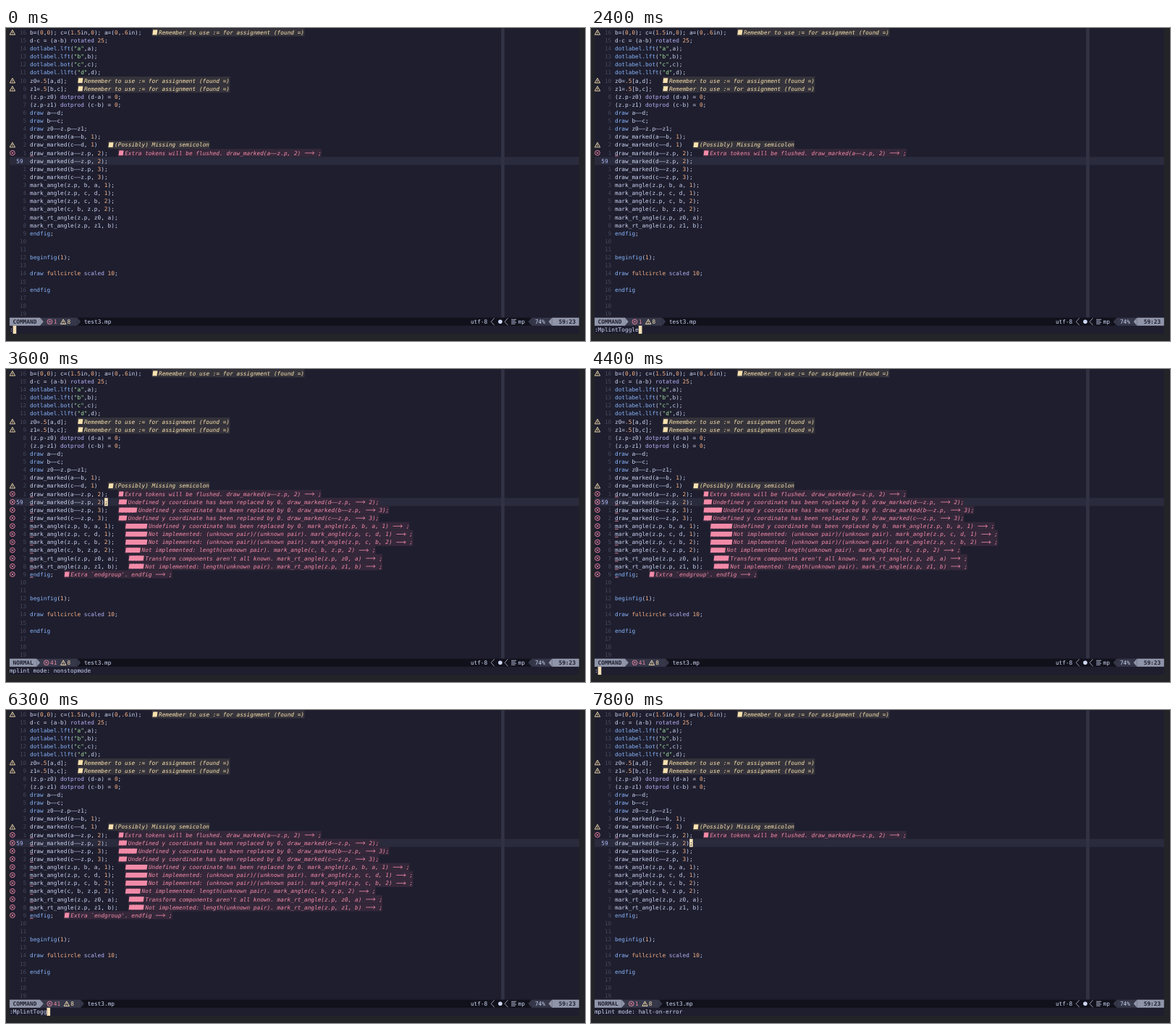
These frames come from a looping animation (800 by 433 pixels, 8 s). An HTML page:

```html
<!DOCTYPE html>
<html lang="en">
<head>
<meta charset="utf-8">
<title>Linting in the editor</title>
<style>
  html, body { margin: 0; width: 100%; height: 100%; overflow: hidden; background: #232427; }
  svg { display: block; width: 100vw; height: 100vh; }
  text {
    font: 7.78px "DejaVu Sans Mono", monospace;
    font-variant-ligatures: none;
    text-rendering: geometricPrecision;
    white-space: pre;
  }
  .it { font-style: italic; }
  .b { font-weight: bold; }
</style>
</head>
<body>
<svg id="stage" viewBox="0 0 800 433">
  <g id="page"></g>
  <g id="lint"></g>
  <g id="live"></g>
</svg>
<script>
const CELL = 4.684, ROW = 11.12, LEFT = 4.9, TOP = 0.4, COLS = 168;
const CURRENT = 16, STATUS = 36, PROMPT = 37, CODE = 6;
const C = {
  base: '#1e1e2e', text: '#cdd6f4', dim: '#45475a', line: '#2a2b3c', rule: '#313244',
  black: '#11111b', chip: '#9095a9', panel: '#36384a', cursor: '#f5e0b8',
  warn: '#f9e2af', warnBg: '#35333b', error: '#f38ba8', errorBg: '#34283a',
  key: '#89b4fa', op: '#b4b0f5', num: '#fab387', str: '#a6e3a1', number: '#b4befe'
};

const code = [
  'b=(0,0); c=(1.5in,0); a=(0,.6in);', 'd-c = (a-b) rotated 25;',
  'dotlabel.lft("a",a);', 'dotlabel.lft("b",b);', 'dotlabel.bot("c",c);', 'dotlabel.llft("d",d);',
  'z0=.5[a,d];', 'z1=.5[b,c];', '(z.p-z0) dotprod (d-a) = 0;', '(z.p-z1) dotprod (c-b) = 0;',
  'draw a--d;', 'draw b--c;', 'draw z0--z.p--z1;', 'draw_marked(a--b, 1);', 'draw_marked(c--d, 1)',
  'draw_marked(a--z.p, 2);', 'draw_marked(d--z.p, 2);', 'draw_marked(b--z.p, 3);', 'draw_marked(c--z.p, 3);',
  'mark_angle(z.p, b, a, 1);', 'mark_angle(z.p, c, d, 1);', 'mark_angle(z.p, c, b, 2);',
  'mark_angle(c, b, z.p, 2);', 'mark_rt_angle(z.p, z0, a);', 'mark_rt_angle(z.p, z1, b);',
  'endfig;', '', '', 'beginfig(1);', '', 'draw fullcircle scaled 10;', '', 'endfig', '', '', ''
];

const ASSIGN = 'Remember to use := for assignment (found =)';
const COORD = 'Undefined y coordinate has been replaced by 0. ';
const MISSING = 'Not implemented: ';
const PAIRS = MISSING + '(unknown pair)/(unknown pair). ';
const LENGTH = MISSING + 'length(unknown pair). ';
const warnings = [[0, ASSIGN], [6, ASSIGN], [7, ASSIGN], [14, '(Possibly) Missing semicolon']];
const firstError = [15, 1, 'Extra tokens will be flushed. draw_marked(a--z.p, 2) --> ;'];
const moreErrors = [
  [16, 2, COORD + 'draw_marked(d--z.p, --> 2);'],
  [17, 5, COORD + 'draw_marked(b--z.p, --> 3);'],
  [18, 2, COORD + 'draw_marked(c--z.p, --> 3);'],
  [19, 6, COORD + 'mark_angle(z.p, b, a, 1) --> ;'],
  [20, 6, PAIRS + 'mark_angle(z.p, c, d, 1) --> ;'],
  [21, 6, PAIRS + 'mark_angle(z.p, c, b, 2) --> ;'],
  [22, 4, LENGTH + 'mark_angle(c, b, z.p, 2) --> ;'],
  [23, 4, "Transform components aren't all known. mark_rt_angle(z.p, z0, a) --> ;"],
  [24, 4, LENGTH + 'mark_rt_angle(z.p, z1, b) --> ;'],
  [25, 1, "Extra `endgroup'. endfig --> ;"]
];

const x = col => LEFT + col * CELL;
const y = row => TOP + row * ROW;
const escape = s => s.replace(/&/g, '&amp;').replace(/</g, '&lt;').replace(/>/g, '&gt;');
const joinDashes = s => s.replace(/--/g, '––');

const box = (col, row, cols, fill, rows = 1) =>
  `<rect x="${x(col)}" y="${y(row)}" width="${cols * CELL}" height="${rows * ROW}" fill="${fill}"/>`;
const stroke = (d, color, width = 0.8) =>
  `<path d="${d}" fill="none" stroke="${color}" stroke-width="${width}" stroke-linejoin="round"/>`;
const markup = (col, row, content, fill, cls = '') =>
  `<text x="${x(col)}" y="${y(row) + 8.4}" fill="${fill}" class="${cls}">${content}</text>`;
const write = (col, row, s, fill, cls) => markup(col, row, escape(s), fill, cls);

// Powerline wedge, one cell wide; dir 1 points right, -1 left
function wedge(col, row, dir, fill) {
  const flat = x(dir > 0 ? col : col + 1), tip = x(dir > 0 ? col + 1 : col);
  return `<path d="M${flat} ${y(row)}L${tip} ${y(row) + ROW / 2}L${flat} ${y(row + 1)}z" fill="${fill}"/>`;
}

function warnIcon(col, row) {
  const cx = x(col) + 4, cy = y(row) + 5.6;
  return stroke(`M${cx} ${cy - 3.4}l3.7 6.6h-7.4zM${cx} ${cy - 1}v2.2M${cx} ${cy + 1.7}v.8`, C.warn, 0.9);
}

function errorIcon(col, row) {
  const cx = x(col) + 4, cy = y(row) + 5.6;
  return `<circle cx="${cx}" cy="${cy}" r="3.4" fill="none" stroke="${C.error}" stroke-width=".9"/>` +
    stroke(`M${cx - 1.4} ${cy - 1.4}l2.8 2.8m0-2.8l-2.8 2.8`, C.error, 0.9);
}

function arrow(col, row, color) {
  const cy = y(row) + 5.7, end = x(col + 3) - 0.7;
  return stroke(`M${x(col) + 0.5} ${cy}H${end}m-2.4-2l2.4 2l-2.4 2`, color);
}

const syntax = [
  [/^"/, C.str],
  [/^\.?\d/, C.num],
  [/^fullcircle/, C.num],
  [/^(rotated|scaled|dotprod)/, C.op],
  [/./, C.key]
];
const token = /"[^"]*"|\b(?:draw|dotlabel\.\w+|rotated|scaled|dotprod|fullcircle|beginfig|endfig)\b|(?<![\w.])\d*\.?\d+/g;
const highlight = s => joinDashes(s).replace(token, word =>
  `<tspan fill="${syntax.find(([test]) => test.test(word))[1]}">${word}</tspan>`);

// Message after a code line, preceded by one marker per finding
function note(row, count, message, color, fill) {
  const start = CODE + code[row].length + 3, col = start + count + 1;
  let out = box(start, row, count + 1 + message.length, fill);
  for (let i = 0; i < count; i++) {
    const left = x(start + i) + 0.7, top = y(row) + 2.2;
    out += `<path d="M${left + 0.9} ${top}h6.2l-.9 6.8h-6.2z" fill="${color}"/>`;
  }
  const at = message.indexOf('-->');
  if (at < 0) return out + write(col, row, message, color, 'it');
  return out + write(col, row, joinDashes(message.slice(0, at)), color, 'it') +
    arrow(col + at, row, color) + write(col + at + 3, row, message.slice(at + 3), color, 'it');
}

const warning = ([row, message]) => warnIcon(0, row) + note(row, 1, message, C.warn, C.warnBg);
const error = ([row, count, message]) => errorIcon(0, row) + note(row, count, message, C.error, C.errorBg) +
  `<rect x="${x(CODE)}" y="${y(row) + 9.4}" width="${CELL}" height=".8" fill="${C.error}"/>`;

function buildPage() {
  let out = box(0, 0, COLS, C.base, 38) + box(0, CURRENT, COLS, C.line) + box(145, 0, 1, C.rule, 36);
  code.forEach((line, row) => {
    out += row === CURRENT
      ? write(2, row, '59', C.number)
      : write(3, row, String(Math.abs(row - CURRENT)).padStart(2), C.dim);
    out += markup(CODE, row, highlight(line), C.text);
  });
  out += warnings.map(warning).join('') + error(firstError);

  const mid = y(STATUS) + ROW / 2;
  const chevron = col => stroke(`M${x(col + 1)} ${y(STATUS) + 0.6}L${x(col) + 0.3} ${mid}L${x(col + 1)} ${y(STATUS + 1) - 0.6}`, C.text, 0.7);
  out += box(0, STATUS, COLS, C.black) + write(136, STATUS, 'utf-8', C.text) + chevron(142) +
    `<circle cx="${x(144) + 3.5}" cy="${mid}" r="2.8" fill="${C.text}"/>` + chevron(146) +
    stroke(`M${x(148)} ${mid - 3}h7m-7 2h5.5m-5.5 2h7m-7 2h5.5`, C.text) +
    write(150, STATUS, 'mp', C.text) +
    wedge(153, STATUS, -1, C.panel) + box(154, STATUS, 6, C.panel) + write(155, STATUS, '74%', C.text) +
    wedge(159, STATUS, -1, C.chip) + box(160, STATUS, 8, C.chip) + write(162, STATUS, '59:23', C.base, 'b');
  return out;
}

function statusLeft(mode, errors) {
  const end = mode.length + 2, count = String(errors), tail = end + 4 + count.length;
  return box(0, STATUS, tail + 6, C.panel) + wedge(tail + 6, STATUS, 1, C.panel) +
    box(0, STATUS, end, C.chip) + wedge(end, STATUS, 1, C.chip) +
    write(1, STATUS, mode, C.base, 'b') +
    errorIcon(end + 2, STATUS) + write(end + 4, STATUS, count, C.error) +
    warnIcon(tail + 1, STATUS) + write(tail + 3, STATUS, '8', C.warn) +
    write(tail + 8, STATUS, 'test3.mp', C.text);
}

const LOOP = 8000, SECOND = 4100;
const command = 'MplintToggle';
const keyTimes = [1100, 1300, 1400, 1500, 1600, 1700, 1900, 2000, 2100, 2200, 2300, 2400];
const typed = t => ':' + command.slice(0, keyTimes.filter(k => k <= t).length);

function stateAt(t) {
  const typing = t < 2600 || (t >= 4200 && t < 6700);
  return {
    typing,
    prompt: typing ? typed(t < 2600 ? t : t - SECOND)
      : 'mplint mode: ' + (t < 4200 ? 'nonstopmode' : 'halt-on-error'),
    linted: t >= 3000 && t < 7100,
    errors: t >= 3100 && t < 7200 ? 41 : 1
  };
}

const live = document.getElementById('live'), lint = document.getElementById('lint');
document.getElementById('page').innerHTML = buildPage();
lint.innerHTML = moreErrors.map(error).join('');

let shown = '';
function frame() {
  const state = stateAt((performance.now() + 5) % LOOP), key = JSON.stringify(state);
  if (key !== shown) {
    shown = key;
    const { typing, prompt, linted, errors } = state;
    lint.style.display = linted ? '' : 'none';
    live.innerHTML = statusLeft(typing ? 'COMMAND' : 'NORMAL', errors) +
      write(0, PROMPT, prompt, C.text) +
      (typing ? box(prompt.length, PROMPT, 1, C.cursor)
        : box(CODE + 22, CURRENT, 1, C.cursor) + write(CODE + 22, CURRENT, ';', C.base));
  }
  requestAnimationFrame(frame);
}
frame();
</script>
</body>
</html>
```
